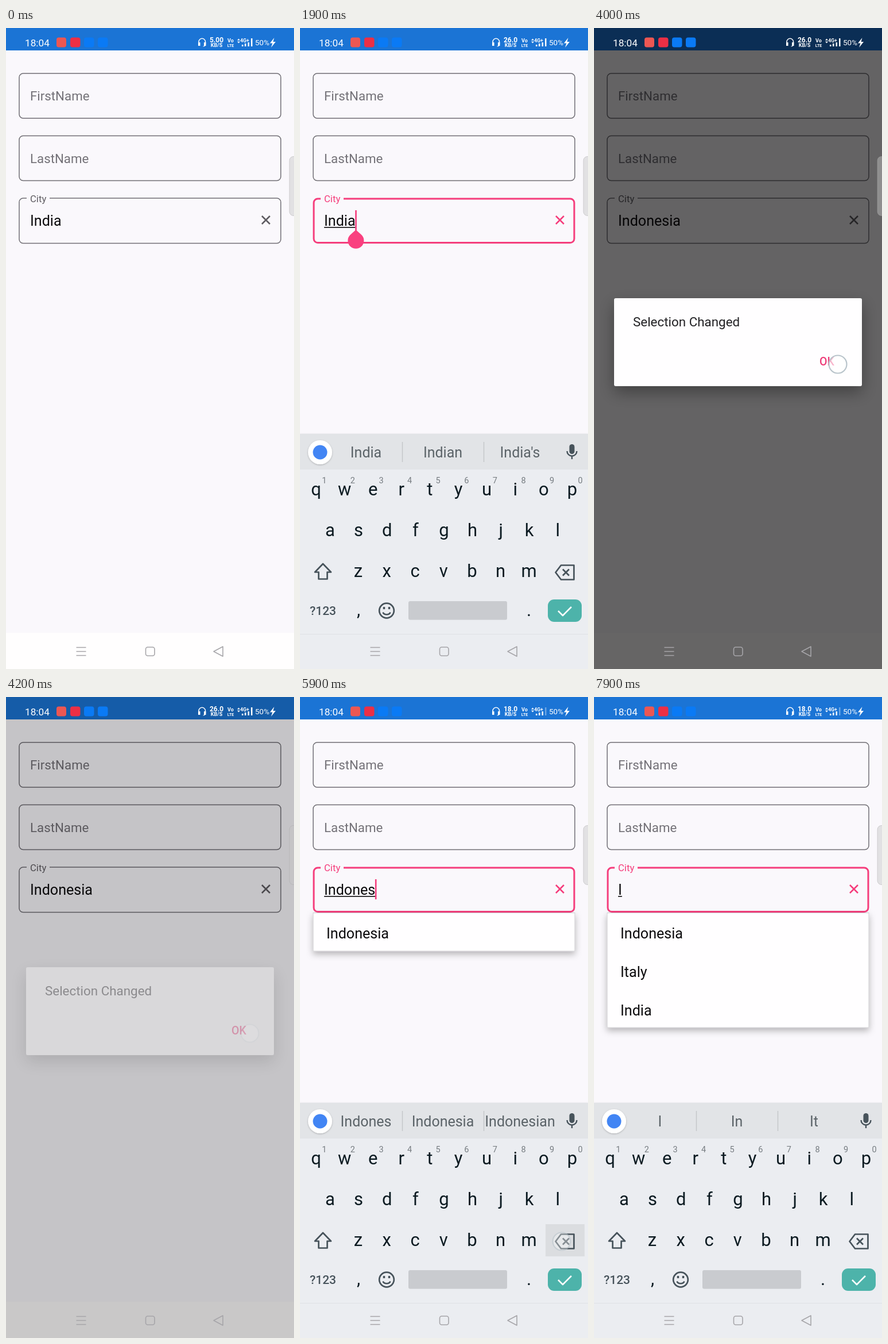
Animation, 502 px wide and 1115 px high, one loop 8 s. Source, as an HTML page:

```html
<!DOCTYPE html>
<html lang="en">
<head>
<meta charset="utf-8">
<title>Country autocomplete</title>
<style>
html, body { margin: 0; width: 100%; height: 100%; overflow: hidden; background: #faf8fc; }
svg { display: block; width: 100%; height: 100%; font-family: Roboto, sans-serif; }
.mid { text-anchor: middle; }
.line { fill: none; stroke-linejoin: round; }
.outline { fill: none; stroke: #706e74; stroke-width: 1.5; }
.hint { font-size: 22.3px; fill: #747278; }
.value { font-size: 25.1px; fill: #0c0b0d; }
.key { font-size: 31px; fill: #0b1a21; text-anchor: middle; }
.digit { font-size: 14.5px; fill: #767c81; text-anchor: middle; }
.chip { font-size: 25px; fill: #5b6368; text-anchor: middle; }
.icon { stroke: #47535b; stroke-width: 2.7; }
.tiny { font-weight: 700; text-anchor: middle; }
#city { color: #5f5c62; }
#city.on { color: #f53d7c; }
#city.on .outline { stroke: #f53d7c; stroke-width: 3; }
</style>
</head>
<body>
<svg viewBox="0 0 502 1115" preserveAspectRatio="none">
  <defs>
    <filter id="shadow" x="-20%" y="-30%" width="140%" height="180%">
      <feDropShadow dx="0" dy="5" stdDeviation="6" flood-opacity=".28"/>
    </filter>
    <filter id="deep" x="-20%" y="-40%" width="140%" height="200%">
      <feDropShadow dx="0" dy="11" stdDeviation="14" flood-opacity=".34"/>
    </filter>
    <filter id="soft" x="-30%" y="-30%" width="160%" height="160%">
      <feDropShadow dx="0" dy="1" stdDeviation="1.5" flood-opacity=".25"/>
    </filter>
    <clipPath id="aboveNav"><rect y="690" width="502" height="364"/></clipPath>
  </defs>

  <rect width="502" height="1115" fill="#faf8fc"/>
  <rect width="502" height="39" fill="#1b74d5"/>

  <rect class="outline" x="23" y="79" width="456" height="78" rx="7"/>
  <text class="hint" x="42" y="126">FirstName</text>
  <rect class="outline" x="23" y="187.5" width="456" height="78" rx="7"/>
  <text class="hint" x="42" y="235">LastName</text>

  <g id="city">
    <rect id="cityBox" class="outline" rx="7"/>
    <rect x="36" y="292" width="40" height="9" fill="#faf8fc"/>
    <text x="42" y="303" font-size="16.7" fill="currentColor">City</text>
    <path d="M446 327l14 14m0-14l-14 14" stroke="currentColor" stroke-width="2.6"/>
    <text id="value" class="value" x="42" y="344"></text>
    <rect id="underline" x="42" y="346" height="1.6" fill="#0c0b0d"/>
    <rect id="caret" y="317" width="2.6" height="35" fill="#f53d7c"/>
  </g>

  <g id="dropdown">
    <rect id="menu" x="23" y="375.5" width="456" fill="#fffeff" stroke="#cfced1" stroke-width="1" filter="url(#shadow)"/>
    <g id="items"></g>
  </g>
  <path id="handle" d="M0 351L10 360A14 14 0 1 1-10 360Z" fill="#f9407f"/>

  <rect id="navBar" y="1052" width="502" height="63"/>
  <g clip-path="url(#aboveNav)">
    <g id="keyboard">
      <rect y="706" width="502" height="350" fill="#ebedf1" filter="url(#soft)"/>
      <rect y="706" width="502" height="62" fill="#e2e4e7"/>
      <circle cx="35" cy="738" r="21" fill="#fff" filter="url(#soft)"/>
      <circle cx="35" cy="738" r="12.5" fill="#4285f4"/>
      <path d="M178.5 720v35M320.5 720v35" stroke="#c3c6c9" stroke-width="1.4"/>
      <g id="chips"></g>
      <rect x="469.5" y="724" width="9" height="17" rx="4.5" fill="#47535b"/>
      <path class="line" d="M465.5 736a8.5 8.5 0 0 0 17 0M474 744v6" stroke="#47535b" stroke-width="2.4"/>
      <g id="keys"></g>
      <rect id="pressed" x="428" y="917" width="68" height="56" fill="#dbdde0"/>
      <path class="line icon" d="M40 932L54 946.500H47.500V958.500H32.500V946.500H26Z"/>
      <path class="line icon" d="M455 934.500H477.500V959.500H455L445.500 947ZM458 941.500l11 11m0-11l-11 11"/>
      <text class="mid" x="40" y="1021" font-size="21" font-weight="500" fill="#47535b">?123</text>
      <text class="key" x="102" y="1022">,</text>
      <text class="key" x="399" y="1023">.</text>
      <circle class="line icon" cx="151" cy="1013.500" r="12.800"/>
      <path class="line icon" d="M144.500 1016.500a7 6 0 0 0 13 0"/>
      <path d="M146.500 1007v4M155.500 1007v4" stroke="#47535b" stroke-width="3.400"/>
      <rect x="189" y="997" width="172" height="32.500" rx="3" fill="#c9cbcf"/>
      <rect x="432" y="994" width="59" height="39" rx="11" fill="#4db3aa"/>
      <path class="line" d="M450 1014l8 8l15-15" stroke="#fff" stroke-width="2.600"/>
    </g>
  </g>
  <path id="navLine" d="M0 1054.500H502" stroke="#dee0e4"/>

  <rect id="dim" width="502" height="1115"/>
  <g id="dialog">
    <rect x="35" y="470" width="432" height="153" rx="3" fill="#fffeff" filter="url(#deep)"/>
    <text x="68" y="518.500" font-size="22.400" fill="#222124">Selection Changed</text>
    <text x="393" y="587" font-size="19.500" font-weight="500" fill="#ee3c78">OK</text>
  </g>

  <g class="line" stroke="#a6a5a9" stroke-width="1.600">
    <path d="M122.500 1077.500h17M122.500 1084.500h17M122.500 1091.500h17"/>
    <rect x="243.500" y="1077" width="15.500" height="15" rx="3.500"/>
    <path d="M378 1076V1093L362 1084.500Z"/>
  </g>
  <rect x="494" y="223.500" width="20" height="103" rx="7" fill="#c4c4c4" fill-opacity=".45" stroke="#a8a8a8" stroke-opacity=".45"/>

  <g fill="#fff">
    <text x="33" y="31.500" font-size="17.200">18:04</text>
    <rect x="88" y="16.500" width="17" height="17" rx="4" fill="#ec5753"/>
    <rect x="112" y="16.500" width="17.500" height="17" rx="4" fill="#ec2f45"/>
    <rect x="136" y="16.500" width="17.500" height="17" rx="4" fill="#0a7af5"/>
    <rect x="160" y="16.500" width="17.500" height="17" rx="4" fill="#0a7af5"/>
    <path class="line" d="M336 27v-3a5.700 5.700 0 0 1 11.500 0v3" stroke="#fff" stroke-width="1.500"/>
    <path d="M335 25h3.500v6H335zM345 25h3.500v6H345z"/>
    <path class="line" d="M347.500 30q0 2-4 2" stroke="#fff"/>
    <text id="speed" class="tiny" x="367" y="25" font-size="12"></text>
    <text class="tiny" x="367" y="33" font-size="9">KB/S</text>
    <text class="tiny" x="391.500" y="24.500" font-size="9">Vo</text>
    <text class="tiny" x="391.500" y="32.500" font-size="7">LTE</text>
    <path d="M403 21.500l2.500-3l2.500 3zM403 23.500l2.500 3l2.500-3z"/>
    <text class="tiny" x="416" y="25" font-size="8.500">4G+</text>
    <path d="M411 29h2.500v3H411zM416 27h2.500v5H416zM421.500 25h2.500v7H421.500z"/>
    <rect id="bar" x="427" y="18" width="2.500" height="14"/>
    <text x="434" y="30" font-size="13.500">50%</text>
    <path d="M467.500 17L460 26.500h4.500L462 34L470 24h-4.500Z"/>
  </g>

  <circle id="touch" r="15.500" fill="#fff" fill-opacity=".62" stroke="#b9c4cb" stroke-width="2.200"/>
</svg>
<script>
const LOOP = 8000;
const $ = id => document.getElementById(id);
const between = (t, a, b) => t >= a && t < b;
const ramp = (t, a, b) => {
  const p = Math.min(1, Math.max(0, (t - a) / (b - a)));
  return 1 - (1 - p) ** 2;
};
const at = (steps, t) => steps.filter(([start]) => start <= t).pop()[1];
const label = (cls, x, y, text) => `<text class="${cls}" x="${x}" y="${y}">${text}</text>`;
const show = (id, on) => $(id).setAttribute('opacity', +on);
const set = (id, attrs) => {
  for (const name in attrs) $(id).setAttribute(name, attrs[name]);
};

const countries = ['Indonesia', 'Italy', 'India'];
const typed = [
  [0, 'India'], [2050, 'Indi'], [2300, 'Ind'], [2550, 'In'], [3200, 'Indonesia'],
  ...[5400, 5800, 6200, 6600, 6850, 7050, 7200, 7350].map((t, i) => [t, 'Indonesia'.slice(0, 8 - i)])
];
const speeds = [[0, '5.00'], [950, '26.0'], [5750, '18.0']];
const guesses = {
  I: ['In', 'It'], In: ['Un', 'On'], Ind: ['India', 'Indian'], Indi: ['Indie', 'India'],
  India: ['Indian', "India's"], Indo: ['Indoor', 'Indoors'], Indon: ['Indonesian', 'Indian'],
  Indonesia: ['Indonesian', "Indonesia's"]
};

// x, y, press, release
const erase = (down, up) => [456, 947, down, up];
const touches = [
  [250, 335, 100, 250], erase(2000, 2100), erase(2250, 2350), erase(2500, 2650),
  [285, 417, 3050, 3220], [425, 585, 3900, 4080], [250, 335, 4400, 4550],
  erase(5350, 5450), erase(5750, 5850), erase(6150, 6250), erase(6550, 7380)
];

const rows = [['qwertyuiop', 28, 813], ['asdfghjkl', 52.5, 884], ['zxcvbnm', 101.5, 954.5]];
$('keys').innerHTML = rows.map(([letters, x0, y], row) => [...letters].map((c, i) => {
  const x = x0 + i * 49.6;
  return label('key', x, y, c) + (row ? '' : label('digit', x + 14.3, 791.5, (i + 1) % 10));
}).join('')).join('');

function setMarkup(id, markup) {
  const node = $(id);
  if (node.cached !== markup) node.innerHTML = node.cached = markup;
}

function drawField(t, text, focused) {
  $('city').setAttribute('class', focused ? 'on' : '');
  const inset = focused ? 1 : 0;
  set('cityBox', { x: 23 + inset, y: 296 + inset, width: 456 - 2 * inset, height: 78.5 - 2 * inset });
  if ($('value').textContent !== text) $('value').textContent = text;
  const width = $('value').getComputedTextLength();
  set('underline', { width });
  set('caret', { x: 41.6 + width });
  set('handle', { transform: `translate(${42.8 + width})` });
  show('underline', focused);
  show('caret', focused && !between(t, 1000, 1500) && t < 7850);
  show('handle', between(t, 350, 2050) || between(t, 4600, 5400));
}

function drawMenu(t, text) {
  const open = between(t, 2050, 3200) || t >= 5400;
  const matches = countries.filter(name => name.startsWith(text));
  set('menu', { height: matches.length * 66.5 });
  setMarkup('items', matches.map((name, i) => label('value', 46, 420 + i * 67, name)).join(''));
  show('dropdown', open);
}

function drawKeyboard(t, text) {
  const lift = ramp(t, 300, 700) - ramp(t, 3450, 3700) + ramp(t, 4600, 4900);
  const word = between(t, 3200, 4300) ? 'In' : text;
  const chips = [word, ...(guesses[word] || ['Indonesia', 'Indonesian'])];
  setMarkup('chips', chips.map((chip, i) =>
    `<text class="chip" x="${[115, 249, 383.5][i]}" y="747"${chip.length > 10 ? ' style="font-stretch:85%;font-size:21.4px"' : ''}>${chip}</text>`).join(''));
  set('keyboard', { transform: `translate(0 ${350 * (1 - lift)})` });
  show('keyboard', lift > 0);
  set('navBar', { fill: lift > 0 ? '#ebedf1' : '#fffefe' });
  show('navLine', lift > 0);
}

function drawDialog(t) {
  const p = ramp(t, 3400, 3620) - ramp(t, 4120, 4320);
  const scale = t < 4000 ? .9 + .1 * p : 1;
  show('dim', p * .6);
  show('dialog', p);
  set('dialog', { transform: `translate(251 546) scale(${scale}) translate(-251 -546)` });
}

function drawTouch(t) {
  const touch = touches.find(([, , down, up]) => between(t, down, up + 150));
  show('touch', touch ? 1 - ramp(t, touch[3], touch[3] + 200) : 0);
  if (touch) set('touch', { cx: touch[0], cy: touch[1] });
  show('pressed', touch && touch[1] === 947 ? 1 : 0);
}

function draw(t) {
  const text = at(typed, t);
  drawField(t, text, between(t, 250, 3200) || t >= 4500);
  drawMenu(t, text);
  drawKeyboard(t, text);
  drawDialog(t);
  drawTouch(t);
  $('speed').textContent = at(speeds, t);
  show('bar', t < 4800 ? 1 : .35);
}

const start = performance.now();
function tick() {
  draw((performance.now() - start) % LOOP);
  requestAnimationFrame(tick);
}
tick();
</script>
</body>
</html>
```
